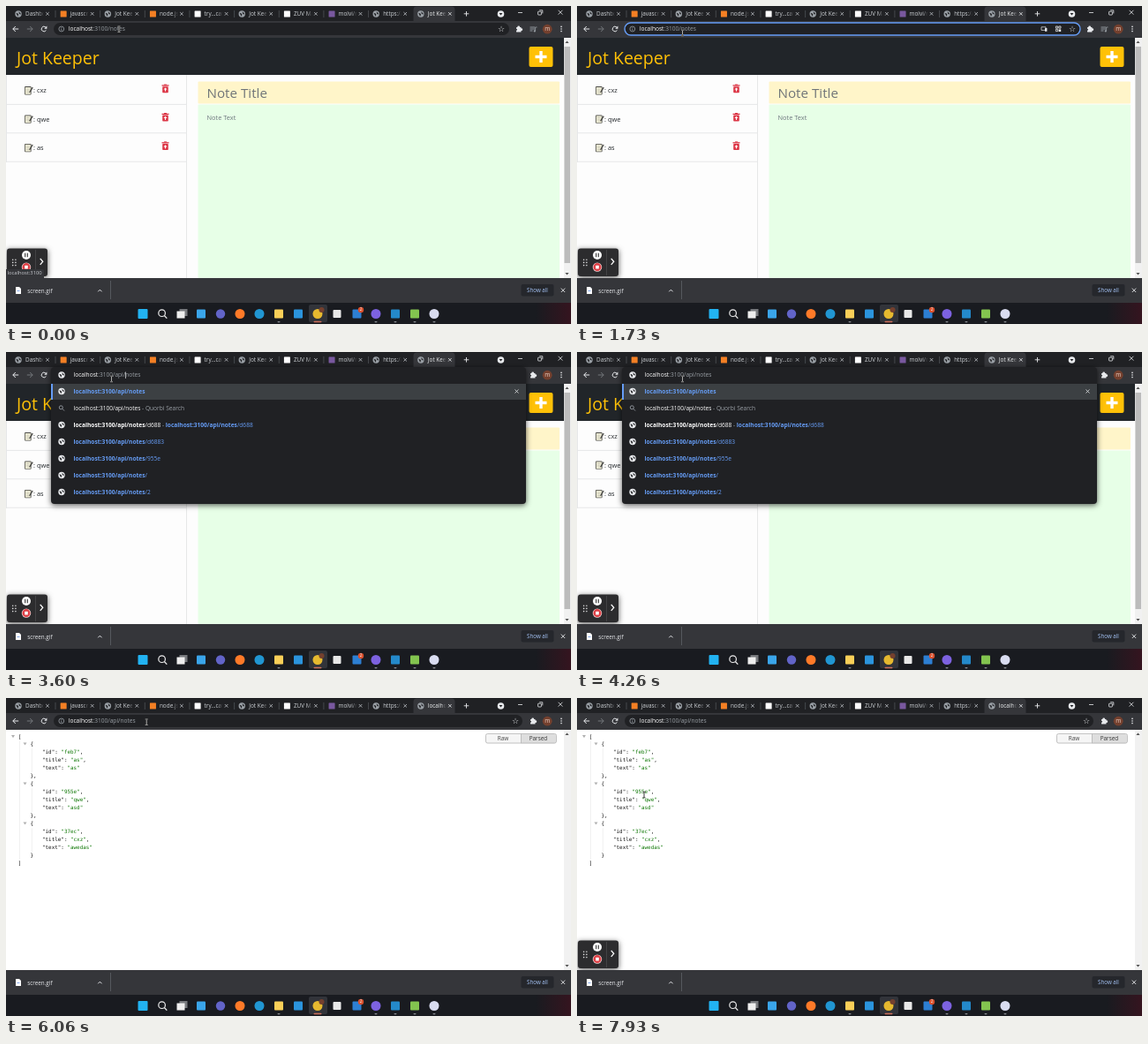
Recreate the animation shown at these times as an HTML page with a canvas. Size 640 by 360 pixels, loop 8 s.

```html
<!DOCTYPE html>
<html lang="en">
<head>
<meta charset="utf-8">
<title>Notes demo</title>
<style>
html, body { margin: 0; width: 100%; height: 100%; overflow: hidden; background: #202124; }
canvas { display: block; }
</style>
</head>
<body>
<canvas id="stage" width="640" height="360"></canvas>
<script>
const ctx = document.getElementById('stage').getContext('2d');
const LOOP = 8000, FOCUS = 930, TYPE = 2200, LOAD = 6000, PANEL_BACK = 6400;
const SANS = '"Open Sans", sans-serif', MONO = '"DejaVu Sans Mono", monospace';
const BAR = '#35363a', DARK = '#202124', PALE = '#e8eaed', GREY = '#9aa0a6', BLUE = '#669df6', INK = '#212529';

// Drawing helpers
function rect(x, y, w, h, color, r = 0) {
  ctx.fillStyle = color;
  ctx.beginPath();
  ctx.roundRect(x, y, w, h, r);
  ctx.fill();
}
function raised(x, y, w, h, color, r) {
  ctx.save();
  ctx.shadowColor = 'rgba(0,0,0,.65)';
  ctx.shadowBlur = 6;
  ctx.shadowOffsetY = 1.5;
  rect(x, y, w, h, color, r);
  ctx.restore();
}
function frame(x, y, w, h, color, r = 0, width = 1) {
  ctx.strokeStyle = color;
  ctx.lineWidth = width;
  ctx.beginPath();
  ctx.roundRect(x, y, w, h, r);
  ctx.stroke();
}
function circle(x, y, r, color) {
  ctx.fillStyle = color;
  ctx.beginPath();
  ctx.arc(x, y, r, 0, 7);
  ctx.fill();
}
function ring(x, y, r, color, width = 1, from = 0, to = 2 * Math.PI) {
  ctx.strokeStyle = color;
  ctx.lineWidth = width;
  ctx.beginPath();
  ctx.arc(x, y, r, from, to);
  ctx.stroke();
}
function line(color, width, ...pts) {
  ctx.strokeStyle = color;
  ctx.lineWidth = width;
  ctx.beginPath();
  for (let i = 0; i < pts.length; i += 2) ctx.lineTo(pts[i], pts[i + 1]);
  ctx.stroke();
}
function poly(color, ...pts) {
  ctx.fillStyle = color;
  ctx.beginPath();
  for (let i = 0; i < pts.length; i += 2) ctx.lineTo(pts[i], pts[i + 1]);
  ctx.fill();
}
function fadeX(x0, x1, from, to) {
  const fade = ctx.createLinearGradient(x0, 0, x1, 0);
  fade.addColorStop(0, from);
  fade.addColorStop(1, to);
  return fade;
}
// Draws text centred on y and returns the x where it ends
function text(str, x, y, size, color, { weight = 400, font = SANS, align = 'left' } = {}) {
  ctx.font = `${weight} ${size}px ${font}`;
  ctx.textAlign = align;
  ctx.fillStyle = color;
  ctx.fillText(str, x, y + size * 0.36);
  return x + ctx.measureText(str).width;
}
function cross(x, y, r, color, width = 1) {
  line(color, width, x - r, y - r, x + r, y + r);
  line(color, width, x - r, y + r, x + r, y - r);
}
function plus(x, y, r, color, width) {
  line(color, width, x - r, y, x + r, y);
  line(color, width, x, y - r, x, y + r);
}
function globe(x, y, color = GREY) {
  circle(x, y, 3.7, color);
  poly(DARK, x - 2.6, y - 1.2, x - 0.6, y - 0.4, x + 0.2, y + 0.8, x - 0.8, y + 2.7);
  poly(DARK, x + 0.4, y - 2.8, x + 2.6, y - 0.8, x + 2.4, y + 0.8, x + 0.9, y - 0.6);
}

const TABS = [
  ['Dashboard'], ['javascript', '#f48024'], ['Jot Keeper'], ['node.js - h', '#f48024'], ['try...catch', '#fff'],
  ['Jot Keeper'], ['ZUV Mail', '#fff'], ['molvi/note', '#79589f'], ['https://no'], ['Jot Keeper'],
];

function tabStrip(loaded) {
  rect(0, 0, 640, 18, DARK);
  rect(461.5, 0.5, 47, 20, BAR, 4);
  TABS.forEach(([label, icon], i) => {
    const x = 14 + i * 50.65, active = i === 9;
    if (icon) rect(x - 3, 5.5, 7, 7, icon, 0.5); else globe(x, 9);
    const color = fadeX(x + 23, x + 29, active ? '#f1f3f4' : '#ced2d6', 'rgba(200,203,208,0)');
    text(active && loaded ? 'localhost:3' : label, x + 8, 9, 6.4, color);
    cross(x + 33, 8.8, 1.8, active ? PALE : '#bdc1c6', 0.8);
    if (i < 8) line('#5f6368', 0.6, x + 42, 5, x + 42, 13);
  });
  plus(521.5, 8.8, 2.8, PALE, 0.9);
  circle(560.5, 9, 3.8, PALE);
  poly(DARK, 558.6, 8, 562.4, 8, 560.5, 10.6);
  line(PALE, 0.8, 580, 7.5, 585, 7.5);
  frame(602.6, 6.2, 3.8, 3.8, PALE, 0.5, 0.8);
  line(PALE, 0.8, 604.2, 4.8, 607.8, 4.8, 607.8, 8.4);
  cross(628, 7.2, 2.4, PALE, 0.8);
}

function arrow(x, dir, color) {
  line(color, 1, x - 3.2, 26, x + 3.2, 26);
  line(color, 1, x + dir * 0.2, 23, x + dir * 3.2, 26, x + dir * 0.2, 29);
}
function star(x) { text('☆', x, 25.6, 9, PALE, { font: '"DejaVu Sans", sans-serif', align: 'center' }); }
function puzzle(x) {
  rect(x - 3, 24, 5.5, 5.5, PALE, 0.6);
  circle(x - 0.3, 23.8, 1.4, PALE);
  circle(x + 2.8, 26.7, 1.4, PALE);
  circle(x - 3, 26.8, 1, BAR);
}

function toolbar(t) {
  const early = t < TYPE;
  rect(0, 17, 640, 19, BAR);
  arrow(11, -1, PALE);
  arrow(27, 1, '#73767a');
  ring(43, 26, 2.8, PALE, 1, 0.5, 5.6);
  poly(PALE, 46.4, 22.6, 46.4, 25.8, 43.2, 25.8);
  rect(54, 19, early ? 516 : 531, 14, DARK, 7);
  ring(62.8, 26, 2.9, GREY, 0.8);
  line(GREY, 0.8, 62.8, 25.5, 62.8, 27.8);
  line(GREY, 0.8, 62.8, 24.2, 62.8, 24.9);
  star(early ? 561 : 577);
  puzzle(early ? 581 : 597);
  if (early) {
    for (const y of [24, 26, 28]) line(GREY, 0.9, 593.5, y, y < 28 ? 599 : 596.5, y);
    circle(598.8, 28.4, 1.1, GREY);
    line(GREY, 0.8, 599.6, 28.4, 599.6, 24, 601.5, 24);
  }
  circle(613.2, 26.2, 5.4, '#74402e');
  text('m', 613.2, 25.5, 6.5, '#f3d9cf', { align: 'center' });
  for (const y of [23.4, 26, 28.6]) circle(629, y, 0.8, PALE);
  if (early && t >= FOCUS) {
    frame(54, 19, 516, 14, BLUE, 7, 1.4);
    frame(526, 23.8, 5, 3.6, PALE, 0, 0.7);
    rect(530, 25, 2.4, 3.8, PALE, 0.4);
    for (const [x, y] of [[542.4, 23], [545.8, 23], [542.4, 26.4]]) frame(x, y, 2.2, 2.2, PALE, 0, 0.8);
    rect(545.6, 26.4, 2.6, 2.6, PALE);
  }
}

// Address typing: [time, text before the caret, text after it]
const EDITS = [
  [1130, '/', 'notes'], [2200, '/a', 'notes'], [2600, '/ap', 'notes'],
  [2800, '/api', 'notes'], [3330, '/api/', 'notes'], [5300, '/api/notes', ''],
];
function address(t) {
  const edit = EDITS.findLast(e => t >= e[0]);
  const loaded = t >= LOAD, x = t >= TYPE && !loaded ? 76.5 : 70.8;
  const [start, head, tail] = edit || [0, '/', 'notes'];
  const hostEnd = text('localhost', x, 26, 6.6, '#fff');
  const caret = text(':3100' + head, hostEnd, 26, 6.6, GREY);
  text(tail, caret, 26, 6.6, GREY);
  if (edit && !loaded && (t - start) % 1000 < 500) line(PALE, 0.7, caret + 0.3, 22.5, caret + 0.3, 30);
  return head + tail;
}

function suggestions(path) {
  const full = path === '/api/notes', host = 'localhost:3100';
  const match = full ? host + path : host;
  const rest = s => (full ? '' : '/api/notes') + s;
  const endings = full ? ['/d6883', '/955e', '/', '/2'] : ['', '/d6883'];
  const bold = { weight: 700 };
  rect(51, 36, 538, 18, '#3c4043');
  rect(51, 36, 2, 18, BLUE);
  globe(63, 44.5, PALE);
  text(host + path, 76.5, 44.5, 6.6, BLUE, bold);
  if (full) cross(578.5, 44.5, 2, PALE, 0.8);

  ring(62.3, 62.8, 2, GREY, 0.9);
  line(GREY, 0.9, 63.8, 64.3, 66, 66.5);
  text(' - Quorbi Search', text(host + path, 76.5, 63.5, 6.6, '#fff'), 63.5, 6.6, GREY);

  const entry = (x, y, color, ending) => text(rest(ending), text(match, x, y, 6.6, color, bold), y, 6.6, color);
  globe(63, 82.5, PALE);
  const end = entry(76.5, 82.5, '#fff', '/d688');
  entry(text(' - ', end, 82.5, 6.6, GREY), 82.5, BLUE, '/d688');
  endings.forEach((ending, i) => {
    const y = 101.5 + i * 19;
    globe(63, y, PALE);
    entry(76.5, y, BLUE, ending);
  });
}

function scrollbar(thumb) {
  rect(632, 36, 8, 272, '#f1f1f1');
  if (thumb) rect(632.5, 46, 6.5, 245, '#bcbcbc');
  poly('#505050', 633.4, 42, 637.6, 42, 635.5, 39.6);
  poly('#505050', 633.4, 302, 637.6, 302, 635.5, 304.4);
}

function memo(x, y) {
  rect(x, y - 4.5, 7.6, 9.3, '#4a4a46', 1);
  rect(x + 0.8, y - 3.6, 6, 7.8, '#f1efd8');
  for (const d of [-1.5, 0.3, 2.1]) line('#b5b3a4', 0.6, x + 1.8, y + d, x + 5.4, y + d);
  line('#4a4a46', 1.4, x + 9.2, y - 3.4, x + 5.6, y + 2.4);
}
function trash(x, y) {
  const red = '#dc3545';
  line(red, 1.3, x - 4, y - 3.6, x + 4, y - 3.6);
  line(red, 1.2, x - 1.5, y - 4.4, x + 1.5, y - 4.4);
  rect(x - 3.3, y - 2.4, 6.6, 7, red, 0.8);
  poly('#fff', x - 2, y + 1, x, y - 1.2, x + 2, y + 1);
  line('#fff', 1.2, x, y, x, y + 3);
}

function notesPage() {
  rect(0, 36, 640, 272, '#fdfdfd');
  rect(0, 36, 632, 42, INK);
  text('Jot Keeper', 12, 59, 19.5, '#ffc107');
  rect(592.5, 46, 27, 23, '#ffc107', 2);
  plus(606, 57.5, 6.5, '#fff', 3.4);
  ['cxz', 'qwe', 'as'].forEach((name, i) => {
    const y = 95.6 + i * 32.4;
    memo(21, y);
    text(': ' + name, 31, y, 7.4, INK);
    trash(180.5, y - 2);
    line('#e6e7e8', 1, 0, y + 15.8, 204, y + 15.8);
  });
  line('#e6e7e8', 1, 204.5, 78, 204.5, 308);
  line('#e6e7e8', 1, 0.5, 78, 0.5, 177);
  rect(217.5, 85.5, 409.5, 25, '#fff5c9', 1);
  text('Note Title', 227.5, 98.6, 15.2, '#6f7478');
  rect(217.5, 111.5, 409.5, 196.5, '#e7ffe7', 1);
  text('Note Text', 227.5, 126.3, 7.4, '#6c757d');
  scrollbar(true);
}

const NOTES = [['feb7', 'as', 'as'], ['955e', 'qwe', 'asd'], ['37ec', 'cxz', 'awedas']];
function jsonPage() {
  const code = (s, x, y, color = '#111') => text(s, x, y, 5.92, color, { font: MONO });
  const fold = (x, y) => poly('#b0b0b0', x - 2, y - 1.4, x + 2, y - 1.4, x, y + 1.8);
  rect(0, 36, 640, 272, '#fff');
  code('[', 13.8, 43.5);
  fold(8, 43.5);
  line('#e6e6e6', 0.6, 15.5, 49, 15.5, 183);
  NOTES.forEach((note, i) => {
    const top = 52.3 + i * 45;
    fold(21.5, top - 0.5);
    code('{', 27.5, top);
    line('#e6e6e6', 0.6, 29.4, top + 5, 29.4, top + 32);
    ['id', 'title', 'text'].forEach((key, k) => {
      const y = top + 9 * (k + 1);
      const end = code(`"${note[k]}"`, code(`"${key}": `, 41, y), y, '#0b7500');
      if (k < 2) code(',', end, y);
    });
    code(i < 2 ? '},' : '}', 27.5, top + 36);
  });
  code(']', 13.8, 187.3);
  rect(543, 40.5, 40, 11, '#f5f5f5', [2, 0, 0, 2]);
  rect(583, 40.5, 40, 11, '#dedede', [0, 2, 2, 0]);
  frame(543.5, 40.5, 80, 10.5, '#b5b5b5', 2, 0.8);
  line('#b5b5b5', 0.8, 583.5, 40.5, 583.5, 51);
  text('Raw', 563, 45.6, 6.4, '#444', { align: 'center' });
  text('Parsed', 603, 45.6, 6.4, '#333', { align: 'center' });
  scrollbar(false);
}

function recorder() {
  raised(1, 274.5, 46, 31.5, '#2c2c2e', 3);
  for (const x of [7.7, 10.9]) for (const y of [287.2, 290.4, 293.6]) circle(x, y, 0.8, '#ddd');
  circle(23, 282, 5, '#fff');
  line('#333', 1.1, 21.7, 279.8, 21.7, 284.2);
  line('#333', 1.1, 24.3, 279.8, 24.3, 284.2);
  circle(23, 295.6, 5.2, '#f3dada');
  circle(23, 295.6, 4.5, '#dd3f45');
  rect(21.2, 293.8, 3.6, 3.6, '#fff', 0.5);
  line('#4a4a4c', 0.8, 33.5, 276, 33.5, 305);
  line('#fff', 1.3, 38.7, 285.8, 41.7, 289.3, 38.7, 292.8);
}

function downloads() {
  rect(0, 308, 640, 28, BAR);
  poly('#fff', 11, 318, 15, 318, 17, 320, 17, 326, 11, 326);
  line('#7fa5e8', 1, 12.5, 322.5, 15.5, 322.5);
  text('screen.gif', 24.3, 322.3, 6.3, PALE);
  line(PALE, 1, 104.3, 323.3, 106.4, 321.2, 108.5, 323.3);
  line('#5f6368', 0.8, 118.5, 311, 118.5, 332);
  rect(583.5, 315, 37, 13.5, '#25272c', 2);
  text('Show all', 602, 321.6, 6.2, '#a8c7fa', { align: 'center' });
  cross(631, 321.8, 2.2, PALE, 0.9);
}

function taskbar() {
  const y = 348.5;
  const square = (x, color, s = 10) => rect(x - s / 2, y - s / 2, s, s, color, 1);
  rect(0, 336, 640, 24, fadeX(600, 640, '#191b20', '#35141f'));
  rect(343, 338, 21, 20, '#32343a', 2);
  square(155, '#22b3f2', 11);
  ring(176.6, 347.7, 3.8, '#eee', 1.2);
  line('#eee', 1.3, 179.4, 350.5, 182.3, 353.6);
  rect(196.5, 343, 9, 8, '#77797d');
  rect(193.5, 345.5, 9, 8, '#eeeeee');
  square(221, '#3aa5ea');
  circle(243, y, 5.2, '#6264c8');
  circle(265, y, 5.5, '#ff7a28');
  circle(287, y, 5.5, '#2196d2');
  square(309, '#f9cf58');
  square(331, '#2b94dd');
  circle(353, y, 5.5, '#e6b92f');
  circle(357.5, 344, 3, '#74402e');
  square(375, '#e8e8e8', 9);
  square(397.5, '#2d7fd3');
  circle(402, 344, 3.2, '#d9502e');
  text('2', 402, 343.8, 4.5, '#fff', { align: 'center' });
  circle(419, y, 5.5, '#7d62e0');
  square(441, '#2489ca');
  square(463, '#83c44f');
  circle(485, y, 5.5, '#d9dcf0');
  for (const x of [309, 419, 441, 463, 485]) rect(x - 1.5, 357, 3, 1.2, '#8c8f94', 0.6);
  rect(348.5, 356.8, 9, 1.5, '#d0705c', 0.7);
}

// Pointer path: [start, end, x, y]
const MOVES = [[60, 860, 119.5, 30.5], [4460, 5260, 159.2, 27.3], [6860, 7700, 76, 109.5]];
function pointer(t) {
  let x = 128, y = 26.3;
  for (const [from, to, tx, ty] of MOVES) {
    const p = Math.min(1, Math.max(0, (t - from) / (to - from)));
    const eased = p * p * (3 - 2 * p);
    x += (tx - x) * eased;
    y += (ty - y) * eased;
  }
  ctx.globalCompositeOperation = 'difference';
  line('#ddd', 0.9, x, y - 3, x, y + 3);
  for (const d of [-3.3, 3.3]) line('#ddd', 0.8, x - 1.5, y + d, x + 1.5, y + d);
  ctx.globalCompositeOperation = 'source-over';
}

function draw(now) {
  const t = now % LOOP, loaded = t >= LOAD, open = t >= TYPE && !loaded;
  tabStrip(loaded);
  toolbar(t);
  if (loaded) jsonPage(); else notesPage();
  if (!loaded || t >= PANEL_BACK) recorder();
  if (t < 400) {
    rect(0, 298, 43, 10, BAR, [0, 2, 0, 0]);
    text('localhost:3100', 1.5, 302.3, 5.8, '#c8cbd0');
  }
  downloads();
  taskbar();
  if (open) {
    raised(51, 17, 538, t >= 3330 ? 155 : 117, DARK, 4);
    globe(63, 26, PALE);
  }
  const path = address(t);
  if (open) suggestions(path);
  pointer(t);
  requestAnimationFrame(() => draw(performance.now() - begin));
}
const begin = performance.now();
draw(0);
</script>
</body>
</html>
```
